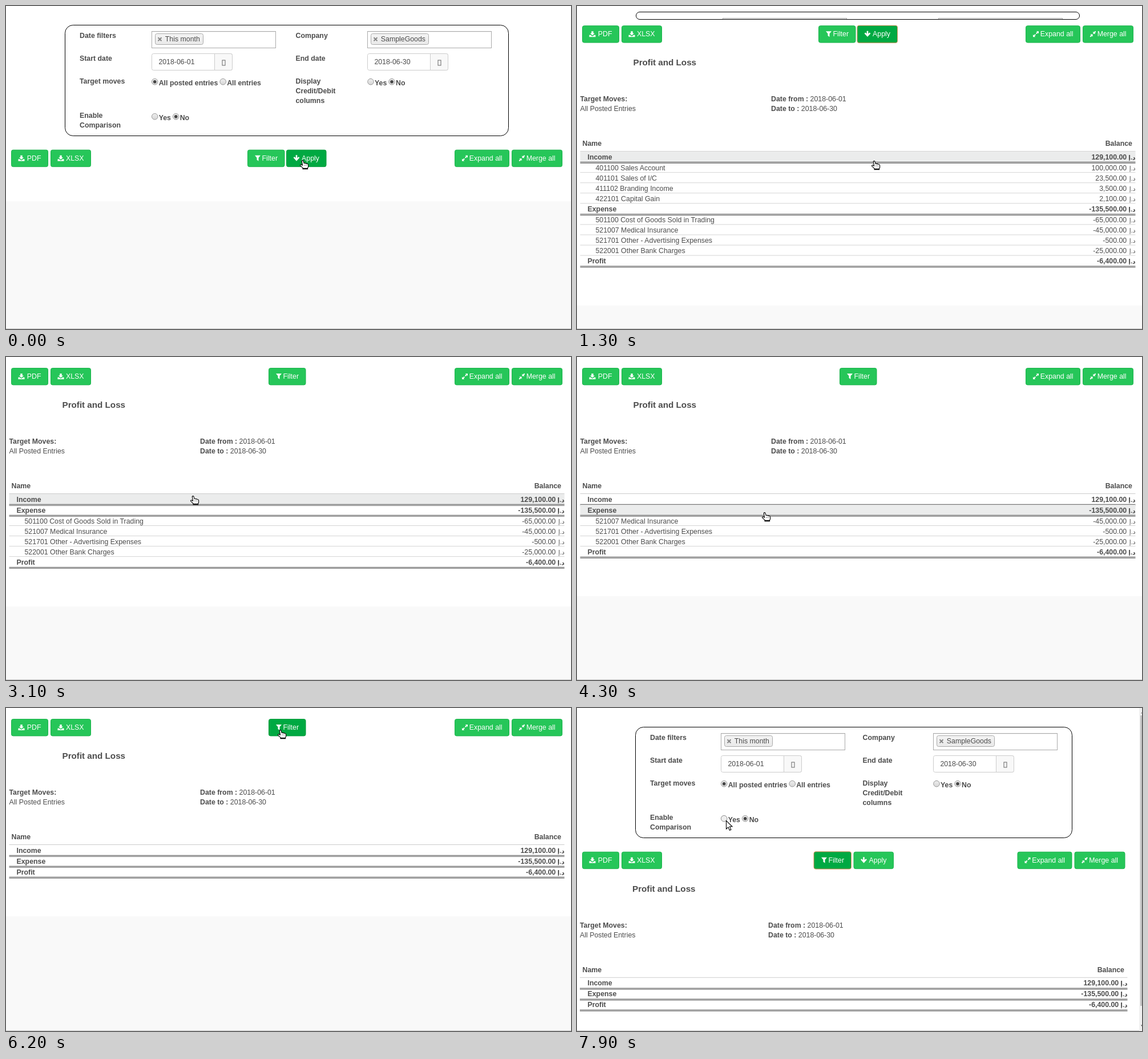
An HTML page that plays this animation: 990x566 px, repeating every 8000 ms.

```html
<!DOCTYPE html>
<html lang="en">
<head>
<meta charset="utf-8">
<title>Profit and Loss report</title>
<style>
  html, body { margin: 0; width: 100%; height: 100%; overflow: hidden; background: #fff; }
  svg { display: block; width: 100%; height: 100%; }
  text { font: 12.35px "Liberation Sans", Arial, "DejaVu Sans", sans-serif; fill: #4c4c4c; white-space: pre; }
  .b { font-weight: bold; }
  .title { font-size: 15.2px; }
  .e { text-anchor: end; }
  .w { fill: #fff; }
  .unit { font-size: 10.8px; }
</style>
</head>
<body>
<svg viewBox="0 0 990 566">
  <defs>
    <linearGradient id="tag" x2="0" y2="1"><stop stop-color="#f4f4f4"/><stop offset="1" stop-color="#e9e9e9"/></linearGradient>
    <linearGradient id="dial" x2="0" y2="1"><stop stop-color="#eee"/><stop offset="1" stop-color="#d6d6d6"/></linearGradient>
  </defs>
  <g id="scene"></g>
</svg>
<script>
const LOOP = 8000;
const ZOOM = 0.95;
const scene = document.getElementById('scene');

const ticks = [0, 200, 700, 800, 900, 1000, 1100, 1200, 1300, 1400, 1500, 1700, 1800, 1900,
  2100, 2200, 2300, 3100, 3300, 3400, 3600, 4300, 4500, 5100, 5400, 5600, 5700, 5900,
  6100, 6200, 6500, 6600, 6900, 7000, 7100, 7300, 7700, 7800, 7900];

// time, hotspot x, hotspot y, shape
const pointer = [
  [0, 520, 270, 'hand'], [200, 521, 270, 'hand'], [900, 520, 271, 'arrow'],
  [1300, 521, 271, 'hand'], [1400, 520, 271, 'arrow'], [1700, 473, 270, 'arrow'],
  [1800, 398, 266, 'arrow'], [1900, 340, 263, 'arrow'], [2100, 337, 257, 'hand'],
  [2200, 332, 249, 'hand'], [2300, 328, 243, 'hand'], [3300, 329, 256, 'hand'],
  [3400, 329, 268, 'hand'], [3600, 329, 272, 'hand'], [5100, 333, 254, 'hand'],
  [5400, 347, 185, 'arrow'], [5600, 428, 122, 'arrow'], [5700, 485, 75, 'arrow'],
  [5900, 485, 68, 'arrow'], [6100, 483, 49, 'hand'], [6200, 481, 38, 'hand'],
  [6900, 481, 38, 'arrow'], [7000, 440, 78, 'arrow'], [7100, 376, 132, 'arrow'],
  [7300, 318, 182, 'arrow'], [7700, 302, 185, 'arrow'], [7800, 276, 192, 'arrow'],
  [7900, 261, 197, 'arrow']
];

const hovered = [[0, ''], [1300, 'Income'], [1400, ''], [2200, 'Income'], [3400, 'Expense'], [5400, '']];

const groups = [
  ['Income', '129,100.00', [
    ['401100 Sales Account', '100,000.00'], ['401101 Sales of I/C', '23,500.00'],
    ['411102 Branding Income', '3,500.00'], ['422101 Capital Gain', '2,100.00']]],
  ['Expense', '-135,500.00', [
    ['501100 Cost of Goods Sold in Trading', '-65,000.00'], ['521007 Medical Insurance', '-45,000.00'],
    ['521701 Other - Advertising Expenses', '-500.00'], ['522001 Other Bank Charges', '-25,000.00']]],
  ['Profit', '-6,400.00', []]
];

const icons = {
  save: 'M-1.7-5H1.7V-1.5H4L0 2.4L-4-1.5H-1.7ZM-5.5 1.5H-3L-1 3.6H1L3 1.5H5.5V5H-5.5Z',
  funnel: 'M-5-5H5L1.5-.8V5L-1.5 2.8V-.8Z',
  down: 'M-1.3-5.5H1.3V-.6L3.8-2.6L5.4-1L0 4.9L-5.4-1L-3.8-2.6L-1.3-.6Z',
  expand: 'M.8-5H5V-.8L3.6-2.2L1.4 0L0-1.4L2.2-3.6ZM-.8 5H-5V.8L-3.6 2.2L-1.4 0L0 1.4L-2.2 3.6Z',
  merge: 'M.4-.4V-4.6L1.8-3.2L4-5.4L5.4-4L3.2-1.8L4.6-.4ZM-.4 .4V4.6L-1.8 3.2L-4 5.4L-5.4 4L-3.2 1.8L-4.6 .4Z'
};

const text = (x, y, s, cls = '') => `<text x="${x}" y="${y}" class="${cls}">${s}</text>`;
const rect = (x, y, w, h, fill, stroke = 'none', r = 0) =>
  `<rect x="${x}" y="${y}" width="${w}" height="${h}" rx="${r}" fill="${fill}" stroke="${stroke}"/>`;
const path = (d, fill, stroke = 'none', extra = '') => `<path d="${d}" fill="${fill}" stroke="${stroke}" ${extra}/>`;
const group = (x, y, body) => `<g transform="translate(${x} ${y})">${body}</g>`;
const rule = (x1, x2, y, color) => path(`M${x1} ${y}H${x2}`, 'none', color);
const latest = (list, t) => list.findLast(k => k[0] <= t);
const swing = x => 0.5 - Math.cos(Math.PI * Math.min(1, Math.max(0, x))) / 2;

// how far the filter panel is unfolded, 0 to 1
const unfold = t => t < 4000 ? 1 - swing((t - 783) / 619) : swing((t - 6553) / 619);

function button(x, y, w, icon, label, state = '') {
  const dark = state !== '';
  const ring = state === 'focus' ? rect(-0.5, -0.5, w + 1, 30.4, 'none', '#d9955c', 3) : '';
  return group(x, y,
    rect(0, 0, w, 29.4, dark ? '#00a942' : '#26c659', dark ? '#009a3b' : '#1bb34c', 3) + ring +
    group(17.5, 14.5, path(icons[icon], '#fff')) + text(w - 12, 18.6, label, 'e w'));
}

function select(x, y, label, w) {
  return group(x + 0.5, y + 0.5,
    rect(0, 0, 217, 29, '#fff', '#aaa') + rule(1, 216, 1, '#eee') +
    rect(6, 4, w, 19, 'url(#tag)', '#aaa', 3) +
    path('M11 10.8L17 16.8M17 10.8L11 16.8', 'none', '#888', 'stroke-width="2"') +
    text(23.3, 17.5, label));
}

function dateBox(x, y, value) {
  return group(x + 0.5, y + 0.5,
    rect(0, 0, 141, 29, '#fff', '#ccc', 3) +
    path('M110 0H138Q141 0 141 3V26Q141 29 138 29H110Z', '#f8f8f8', '#ccc') +
    text(11.9, 18.9, value) + rect(123.5, 11.5, 5, 9, 'none', '#666'));
}

function radio(x, y, label, on, hot) {
  return `<circle cx="${x}" cy="${y}" r="5.3" fill="${hot ? '#eee' : 'url(#dial)'}" stroke="${hot ? '#888' : '#999'}"/>` +
    (on ? `<circle cx="${x}" cy="${y}" r="2.8" fill="#444"/>` : '') + text(x + 7, y + 6.5, label, 'b');
}

function panel(t, p, narrow) {
  const x = narrow ? 102.5 : 103.5, w = narrow ? 765 : 777;
  const top = Math.round(8.8 + 24 * p) + 0.5;
  const bulge = t > 4000 ? 12 * p * (1 - p) : 0;
  const h = Math.round(0.8 + 193.4 * p + bulge);
  const r = Math.min(14, h / 2);
  const [a, b, c, d] = narrow ? [128, 252, 500.5, 624] : [129, 255, 507.5, 633];
  const label = (lx, y, ...lines) => lines.map((s, i) => text(lx, y + 17.1 * i, s, 'b')).join('');
  const body =
    label(a, 56, 'Date filters') + label(a, 96, 'Start date') + label(a, 136, 'Target moves') +
    label(a, 196, 'Enable', 'Comparison') + label(c, 56, 'Company') + label(c, 96, 'End date') +
    label(c, 136, 'Display', 'Credit/Debit', 'columns') +
    select(b, 44, 'This month', 84) + select(d, 44, 'SampleGoods', 101) +
    dateBox(b, 83, '2018-06-01') + dateBox(d, 83, '2018-06-30') +
    radio(b + 5.7, 132.7, 'All posted entries', true) + radio(b + 125.2, 132.7, 'All entries') +
    radio(d + 6, 132.7, 'Yes') + radio(d + 43, 132.7, 'No', true) +
    radio(b + 5.7, 193.7, 'Yes', false, t >= 7900) + radio(b + 42.7, 193.7, 'No', true);
  return `<clipPath id="inside">${rect(x, top, w, h, '#000', 'none', r)}</clipPath>` +
    `<g clip-path="url(#inside)">${group(0, top - 33.5, body)}</g>` + rect(x, top, w, h, 'none', '#000', r);
}

function toolbar(t, y, narrow) {
  const alone = t >= 1500 && t < 7300;
  const shift = narrow ? 14.5 : 0;
  const filterX = (alone ? 460.5 : 423.5) - (narrow ? 8 : 0);
  const filterState = t >= 6500 ? 'focus' : t >= 6100 ? 'hover' : '';
  const applyState = t >= 1500 ? '' : t >= 700 ? 'focus' : 'hover';
  return button(9.5, y, 64, 'save', 'PDF') + button(78.5, y, 70, 'save', 'XLSX') +
    button(filterX, y, 64.5, 'funnel', 'Filter', filterState) +
    (alone ? '' : button(filterX + (narrow ? 69.5 : 68), y, 69.5, 'down', 'Apply', applyState)) +
    button(786.5 - shift, y, 95, 'expand', 'Expand all') + button(886.5 - shift, y, 88, 'merge', 'Merge all');
}

// returns markup and the centre of the last row
function report(t, s, narrow) {
  const left = narrow ? 5 : 5.5, right = narrow ? 964.5 : 978.5, mid = narrow ? 335 : 340;
  const hot = latest(hovered, t)[1];
  const skip = { Income: t < 3100 ? 0 : 4, Expense: t < 4300 ? 0 : t < 4500 ? 1 : 4, Profit: 0 };
  const amount = (y, n, cls = '') =>
    text(right - 15.3, y, n, 'e ' + cls) + text(right, y, 'د.إ', 'e unit ' + cls);
  const dated = (y, head, value) =>
    `<text x="${mid}" y="${y}"><tspan class="b">${head} : </tspan>${value}</text>`;

  let out = text(narrow ? 97 : 98.5, 89 + s, 'Profit and Loss', 'b title') +
    text(left, 152 + s, 'Target Moves:', 'b') + text(left, 169 + s, 'All Posted Entries') +
    dated(152 + s, 'Date from', '2018-06-01') + dated(169 + s, 'Date to', '2018-06-30') +
    text(9.5, 230 + s, 'Name', 'b') + text(right - 5.5, 230 + s, 'Balance', 'b e') +
    rule(left, right, 239.5 + s, '#ccc');

  let y = 249 + s, last = y;
  for (const [name, total, children] of groups) {
    if (name === hot) out += rect(left, y - 9, right - left, 18, '#ebecec');
    out += text(18.5, y + 4.5, name, 'b') + amount(y + 4.5, total, 'b') +
      rule(left, right, y + 9.3, '#555') + rule(left, right, y + 11.2, '#555');
    last = y;
    y += 20 * ZOOM;
    for (const [label, n] of children.slice(skip[name])) {
      out += text(32.5, y + 4.5, label) + amount(y + 4.5, n) + rule(left, right, y + 8.5, '#d4d4d4');
      y += 19 * ZOOM;
    }
  }
  return [out, last];
}

function scrollbar(t) {
  const end = t < 7300 ? 529 : 522;
  return rect(985, 0, 5, 566, '#f1f1f1') + rect(987, 13, 3, end - 13, '#c1c1c1') +
    path('M988 9.5L990 7V9.5Z', '#888') + path('M988 555.5H990V558Z', '#444');
}

function cursor(t) {
  const [, x, y, shape] = latest(pointer, t);
  if (shape === 'arrow')
    return group(x, y, path('M.5 .5V15L4 11.8L6.4 17.2L8.9 16.1L6.5 10.8H11Z', '#fff', '#000', 'stroke-width="1.1"'));
  return group(x - 5, y,
    path('M3.3 1.9Q3.3 .6 4.6 .6Q5.6 .6 6 1.7L7.2 5.6Q8.4 4.7 9.6 5.9Q10.8 5.2 11.9 6.5Q14.6 6.2 14.6 8.6V12.2L13.6 13.5V15.7H5V13.6L1.2 10.2Q0 8.8 1 8.1Q2 7.5 3.3 8.5L4.6 9.3Z',
      '#fff', '#000', 'stroke-width="1.1" stroke-linejoin="round"') +
    path('M7.6 8V10M9.8 8V10M12 8V10', 'none', '#666', 'stroke-width=".7"') +
    path('M5 14.8H13.6', 'none', '#000', 'stroke-width="1.8"'));
}

function draw(t) {
  const p = unfold(t), narrow = t >= 7100;
  const s = Math.round(245 * p) * ZOOM;
  let body = '', greyTop = 109.5 + s;
  if (t >= 1200) {
    const [markup, last] = report(t, s, narrow);
    body = markup;
    greyTop = last + 78;
  }
  scene.innerHTML = rect(0, 0, 990, 566, '#fff') +
    (greyTop < 565 ? rect(0, greyTop, 990, 566 - greyTop, '#f9f9f9') : '') +
    (s > 0 ? panel(t, p, narrow) : '') + toolbar(t, 19.5 + s, narrow) + body +
    rule(0, 990, 565.5, '#c8c8c8') + (narrow ? scrollbar(t) : '') + cursor(t);
}

let shown = -1;
function frame(now) {
  const tick = ticks.findLast(k => k <= now % LOOP) ?? 0;
  if (tick !== shown) draw(shown = tick);
  requestAnimationFrame(frame);
}
draw(shown = 0);
requestAnimationFrame(frame);
</script>
</body>
</html>
```
